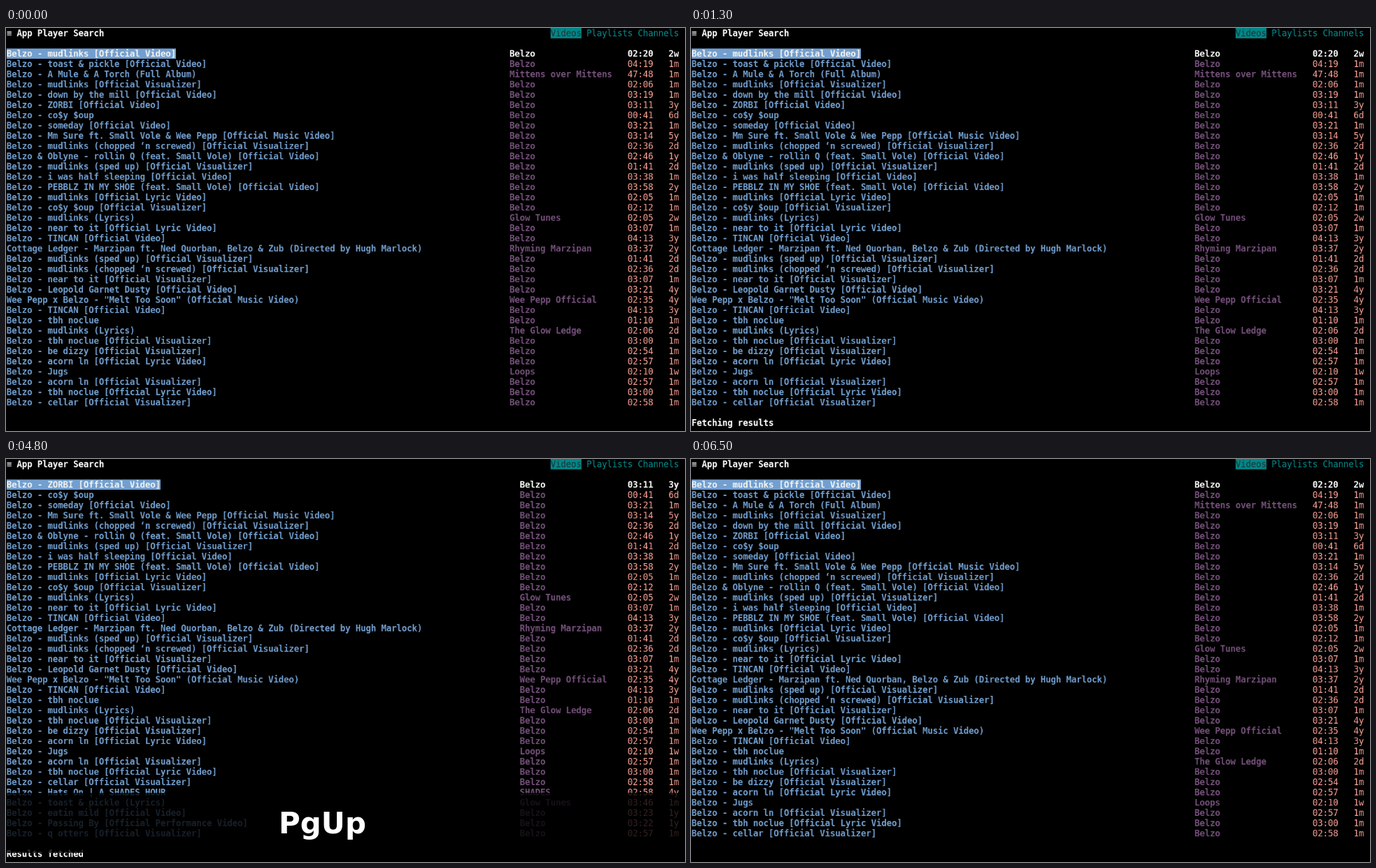
An HTML page with a canvas for the animation above (8000 ms loop, 971 by 577 pixels).

```html
<!DOCTYPE html>
<html lang="en">
<head>
<meta charset="utf-8">
<title>Terminal search</title>
<style>
html, body { margin: 0; width: 100%; height: 100%; overflow: hidden; background: #000; }
#stage { position: relative; width: 971px; height: 577px; overflow: hidden; }
canvas, svg { position: absolute; left: 0; top: 0; width: 971px; height: 577px; }
text { font: bold 42px 'DejaVu Sans', sans-serif; }
</style>
</head>
<body>
<div id="stage">
  <canvas id="terminal" width="1323" height="786"></canvas>
  <svg viewBox="0 0 971 577">
    <g id="emoji">
      <circle cx="565.7" cy="95.3" r="6.3" fill="#f6c65a"/>
      <g fill="#fff"><circle cx="563.1" cy="94.3" r="2"/><circle cx="568.3" cy="94.3" r="2"/></g>
      <g fill="#4a3420"><circle cx="563.1" cy="94.3" r=".9"/><circle cx="568.3" cy="94.3" r=".9"/>
        <rect x="564" y="98.4" width="3.4" height="1"/></g>
      <g fill="#ee8a62"><circle cx="561.6" cy="97.6" r="1.3"/><circle cx="569.8" cy="97.6" r="1.3"/></g>
    </g>
    <g id="keys">
      <rect y="478" width="971" height="86" opacity=".8"/>
      <g id="enter" stroke="#fff" stroke-width="2">
        <path id="arrow" d="M461 505.5H467.5V524.5H450.5V532L438.5 521.5L450.5 511V518H461Z"/>
        <use href="#arrow" x="1.3" y="1.3" fill="#fff"/>
        <use href="#arrow"/>
      </g>
      <text id="pgup" x="390" y="535.5" fill="#fff">PgUp</text>
      <rect id="underline" x="390" y="536.6" width="125" height="2.2" fill="#fff"/>
    </g>
  </svg>
</div>
<script>
const CELL_W = 10, CELL_H = 20, LEFT = 1, ASCENT = 16, PAGE = 35, LOOP = 8000;
const ARTIST = 'Belzo';
const KINDS = { V: 'Video', Z: 'Visualizer', L: 'Lyric Video', A: 'Audio', M: 'Music Video' };
const WHITE = '#fff', BLUE = '#729fcf', PURPLE = '#75507b', SALMON = '#ffa598', TEAL = '#068f8f';

// title|channel|length age; "@" is the artist, "[V]" an official tag, an empty channel the artist's own
const FIRST = `@ - mudlinks [V]||02:20 2w
@ - toast & pickle [V]||04:19 1m
@ - A Mule & A Torch (Full Album)|Mittens over Mittens|47:48 1m
@ - mudlinks [Z]||02:06 1m
@ - down by the mill [V]||03:19 1m
@ - ZORBI [V]||03:11 3y
@ - co$y $oup||00:41 6d
@ - someday [V]||03:21 1m
@ - Mm Sure ft. Small Vole & Wee Pepp [M]||03:14 5y
@ - mudlinks (chopped ‘n screwed) [Z]||02:36 2d
@ & Oblyne - rollin Q (feat. Small Vole) [V]||02:46 1y
@ - mudlinks (sped up) [Z]||01:41 2d
@ - i was half sleeping [V]||03:38 1m
@ - PEBBLZ IN MY SHOE (feat. Small Vole) [V]||03:58 2y
@ - mudlinks [L]||02:05 1m
@ - co$y $oup [Z]||02:12 1m
@ - mudlinks (Lyrics)|Glow Tunes|02:05 2w
@ - near to it [L]||03:07 1m
@ - TINCAN [V]||04:13 3y
Cottage Ledger - Marzipan ft. Ned Quorban, @ & Zub (Directed by Hugh Marlock)|Rhyming Marzipan|03:37 2y
@ - mudlinks (sped up) [Z]||01:41 2d
@ - mudlinks (chopped ‘n screwed) [Z]||02:36 2d
@ - near to it [Z]||03:07 1m
@ - Leopold Garnet Dusty [V]||03:21 4y
Wee Pepp x @ - "Melt Too Soon" (Official Music Video)|Wee Pepp Official|02:35 4y
@ - TINCAN [V]||04:13 3y
@ - tbh noclue||01:10 1m
@ - mudlinks (Lyrics)|The Glow Ledge|02:06 2d
@ - tbh noclue [Z]||03:00 1m
@ - be dizzy [Z]||02:54 1m
@ - acorn ln [L]||02:57 1m
@ - Jugs|Loops|02:10 1w
@ - acorn ln [Z]||02:57 1m
@ - tbh noclue [L]||03:00 1m
@ - cellar [Z]||02:58 1m
@ - Hats On | A SHADES HOUR|SHADES|02:58 4y
@ - toast & pickle (Lyrics)|Glow Tunes|03:46 1m
@ - eatin mild [V]||03:23 1y
@ - Passing By [Official Performance Video]||03:22 1y
@ - q otters [Z]||02:57 1m`.split('\n');

const MORE = `@ & Oblyne - rollin Q (feat. Small Vole) [A]||02:17 1y
@ - Tiny Wallet (Starring Maribel Tarn) [V]||03:15 4y
@ - down by the mill (Lyrics)|Glow Tunes|03:14 1m
@ Exposes Truth About Small Vole (Interrogation)|Drumologist|12:12 3w
@’s Music Brings Entire ATL Night Club To Scarecrow Challenge Stillness|BeatsNQR|04:07 1m
@ & CFO Bramle - Anyone’s Guest|QTGlobWise|01:36 1w
Skolariat on Wee Hask Calling @ a Rat in Their Interview: I'm Shocked He Said That (Part 12)|mcbrot|04:41 4w
Wee Pepp Calls Out @ For Dissing Him & Snitching IG Live|Old Pan|12:16 1m
down by the mill||03:14 0s
Bonk350 Reacts to @ Dissing Him on His New Album|My Sweater Bits|06:26 4w
@ - toast & pickle [Z]||03:47 1m
@ - be dizzy [L]||02:53 1m
@ - cellar [L]||02:58 1m
@ - mudlinks (Lyrics)|Pun Town|02:06 3w
@ - why she ran home (feat. Zenmo Green) [A]||02:40 1y
@ - folded your coat [L]||04:04 1m
@ - A Mule & A Torch (FULL ALBUM)|QX|45:03 1m
@ - down by the mill [Z]||03:14 1m
@ - FOG WENT OFF [V]||02:32 2y
@ - kitten shawl [A]||02:22 1y
@ - Seven Footed Heron ft. Small Vole [V]||04:03 4y
@ Returns on new Song and Goes Crazy on Wee Pepp, Wee Hask, XD O and Others!|MC Skolariat|10:45 1m
@ - Teacups (Fast)|MC Pondle382|02:35 1m
@ - Per Us (Once Noticed)|mudlord|03:12 3w
@ - river by noon [A]||02:02 1y
@ - drizzly [A]||02:32 1y
q otters||02:57 0s
@ - Knack [M]||04:00 5y
@ - Melt or Marsh [M]||02:01 5y
@ - year of oat (feat. Lorbie) [A]||02:53 1y
@ - near to it (with drums) [reprod. by OhoRichkid]|OhoRichkid|03:10 1m
@ - q otters [L]||02:57 1m
@ - river by noon [Lyric Video]||02:03 1y
Wee Morba - UNFOLD IT ft. @ (Official Video)|Wee Morba|03:35 1y
Wee Hask - Word Arrived for Anselm ft. @ (Directed by Hugh Marlock)|Rhyming Marzipan|03:15 1y`.split('\n');

// rows of each page and the column where its channels begin
const SCREENS = {
  top: [FIRST.slice(0, PAGE), 98],
  more: [MORE, 102],
  middle: [FIRST.slice(5), 100]
};

// start time, screen, status line, key overlay
const STEPS = [
  [0, 'top', '', ''],
  [500, 'top', '', 'blank'],
  [600, 'top', '', 'enter'],
  [700, 'top', 'Fetching results', 'enter'],
  [1300, 'top', 'Fetching results', ''],
  [3700, 'more', 'Results fetched', ''],
  [4800, 'middle', 'Results fetched', 'pgup'],
  [5600, 'top', '', 'pgup underline'],
  [5800, 'top', '', 'pgup'],
  [6500, 'top', '', '']
];

const byId = id => document.getElementById(id);
const canvas = byId('terminal');
const ctx = canvas.getContext('2d');

// Each character sits in its own terminal cell.
function put(col, row, text, color, weight = 'bold', back = null) {
  const x = LEFT + col * CELL_W, y = row * CELL_H;
  if (back) {
    ctx.fillStyle = back;
    ctx.fillRect(x, y, text.length * CELL_W, CELL_H);
  }
  ctx.font = `${weight} 17px 'DejaVu Sans Mono', monospace`;
  ctx.fillStyle = color;
  [...text].forEach((char, i) => ctx.fillText(char, x + i * CELL_W, y + ASCENT));
}

function expand(title) {
  return title.replaceAll('@', ARTIST).replace(/\[([VZLAM])\]/, (_, k) => `[Official ${KINDS[k]}]`);
}

function drawRow(line, row, channelCol, picked) {
  const parts = line.split('|');
  const [length, age] = parts.pop().split(' ');
  const channel = parts.pop() || ARTIST;
  const weight = picked ? 'bold' : 'normal';
  put(0, row, expand(parts.join('|')), picked ? '#f4f4f2' : BLUE, 'bold', picked && BLUE);
  put(channelCol, row, channel, picked ? WHITE : PURPLE);
  put(121, row, length, picked ? WHITE : SALMON, weight);
  put(129, row, age, picked ? WHITE : SALMON, weight);
}

function drawTerminal(name, message) {
  ctx.fillStyle = '#000';
  ctx.fillRect(0, 0, canvas.width, canvas.height);
  put(0, 0, '≡', WHITE, 'normal');
  put(2, 0, 'App Player Search', WHITE);
  put(106, 0, 'Videos', '#203236', 'normal', '#008787');
  put(113, 0, 'Playlists Channels', TEAL, 'normal');
  const [lines, channelCol] = SCREENS[name];
  lines.forEach((line, i) => drawRow(line, i + 2, channelCol, i === 0));
  put(0, 38, message, WHITE);
}

function show(id, on) {
  byId(id).style.display = on ? '' : 'none';
}

let shown = null;

function tick() {
  const time = performance.now() % LOOP;
  const step = STEPS.findLast(s => s[0] <= time);
  if (step !== shown) {
    const [, name, message, key] = shown = step;
    drawTerminal(name, message);
    show('emoji', name === 'more');
    show('keys', key);
    show('enter', key === 'enter');
    show('pgup', key.startsWith('pgup'));
    show('underline', key.endsWith('underline'));
  }
  requestAnimationFrame(tick);
}
tick();
</script>
</body>
</html>
```
